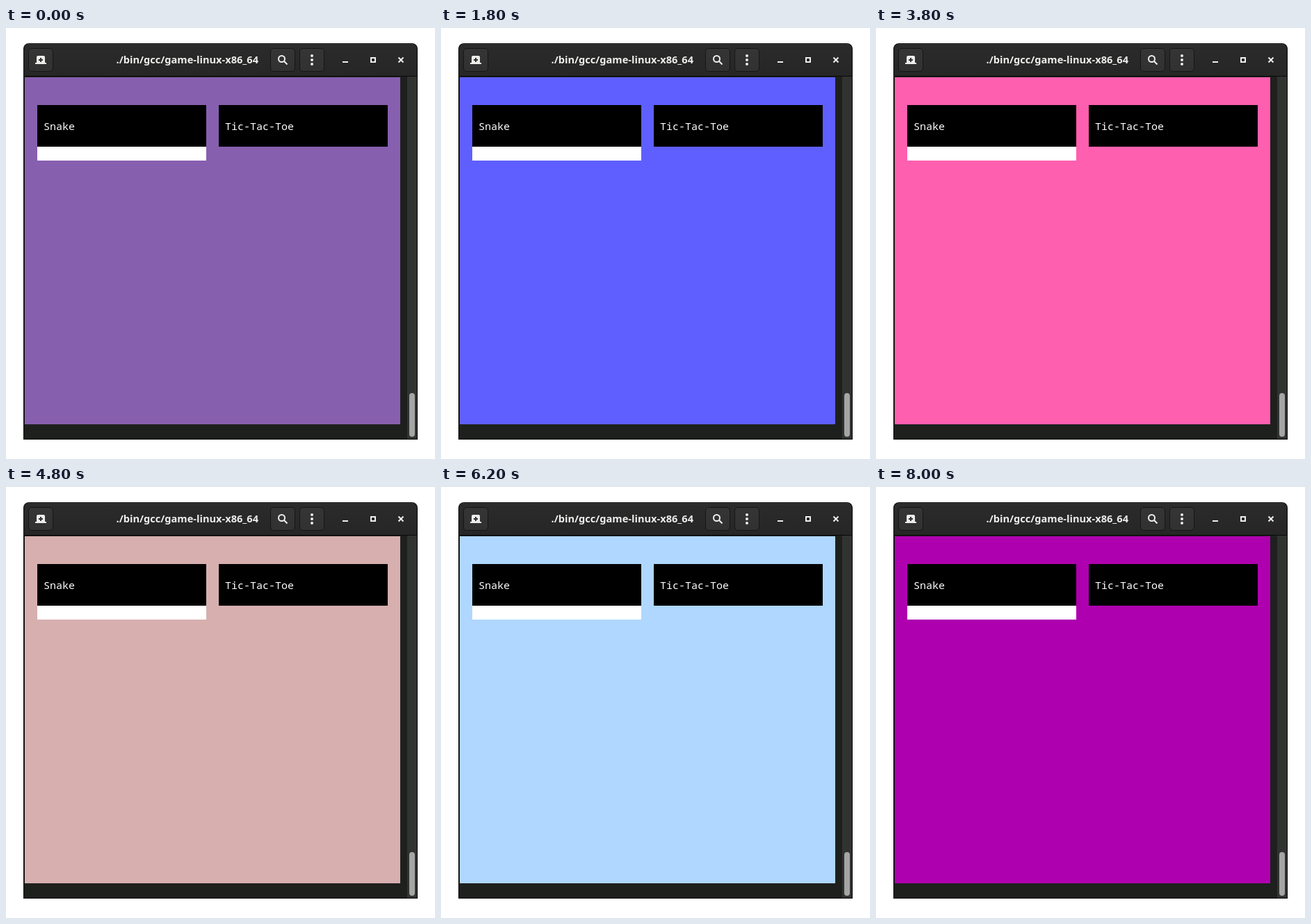
These frames come from a looping animation (617 by 621 pixels, 8200 ms). An HTML page:

```html
<!DOCTYPE html>
<html lang="en">
<head>
<meta charset="utf-8">
<title>Game menu</title>
<style>
  html, body { margin: 0; width: 100%; height: 100%; overflow: hidden; background: #fff; }
  svg { display: block; }
  .title { font: bold 14.6px "Noto Sans", "Open Sans", sans-serif; fill: #eeeeec; text-anchor: middle; }
  .cell { font: 15px "Noto Sans Mono", "DejaVu Sans Mono", monospace; fill: #fff; }
  .button { fill: url(#raised); stroke: #161616; }
  .line { fill: none; stroke: #eeeeec; stroke-width: 2; }
  .icon { fill: #eeeeec; }
</style>
</head>
<body>
<svg width="617" height="621" viewBox="0 0 617 621">
  <defs>
    <linearGradient id="bar" x2="0" y2="1">
      <stop offset="0" stop-color="#2b2b2b"/>
      <stop offset="1" stop-color="#252625"/>
    </linearGradient>
    <linearGradient id="raised" x2="0" y2="1">
      <stop offset="0" stop-color="#353535"/>
      <stop offset="1" stop-color="#303130"/>
    </linearGradient>
  </defs>

  <!-- Window -->
  <path d="M25 593V30a8 8 0 0 1 8-8H584a8 8 0 0 1 8 8V593z" fill="#070707"/>
  <path d="M26 69V30a7 7 0 0 1 7-7H584a7 7 0 0 1 7 7V69z" fill="url(#bar)"/>
  <path d="M31 23.5H586" stroke="#383838"/>
  <path d="M26 70H591V592H26z" fill="#1e201e"/>
  <path d="M577 70H591V592H577z" fill="#313331"/>
  <rect x="580" y="526" width="8" height="63" rx="4" fill="#a4a5a4"/>

  <!-- Header -->
  <rect class="button" x="32.5" y="29.5" width="35" height="33" rx="4.5"/>
  <rect class="button" x="380.5" y="29.5" width="35" height="33" rx="4.5"/>
  <rect class="button" x="422.5" y="29.5" width="35" height="33" rx="4.5"/>
  <path class="icon" d="M44 50V42a2 2 0 0 1 2-2h8a2 2 0 0 1 2 2v8h2v2H42v-2z"/>
  <path d="M47 46h6M50 43v6" stroke="#303130" stroke-width="2"/>
  <text class="title" x="260.8" y="51">./bin/gcc/game-linux-x86_64</text>
  <circle class="line" cx="396.5" cy="44.5" r="4.5"/>
  <path class="line" d="M399.8 47.8L404.5 52.5"/>
  <g class="icon">
    <circle cx="440" cy="40" r="2"/>
    <circle cx="440" cy="46" r="2"/>
    <circle cx="440" cy="52" r="2"/>
    <path d="M484 48h8v2h-8z"/>
  </g>
  <path class="line" d="M525 43h6v6h-6z"/>
  <path class="line" d="M564.5 42.5l7 7m0-7l-7 7"/>

  <!-- Menu -->
  <rect id="screen" x="27" y="71" width="540" height="500" fill="#875faf"/>
  <path d="M45 111h243v60H45zM306 111h243v60H306z"/>
  <path d="M45 171h243v20H45z" fill="#fff"/>
  <text class="cell" x="54" y="147">Snake</text>
  <text class="cell" x="315" y="147">Tic-Tac-Toe</text>
</svg>
<script>
  const STEP = 200, STEPS = 41, CUBE = 216;
  const screen = document.getElementById("screen");

  // [step, position] of a downward sweep through the 6x6x6 terminal colour cube
  const sweep = [[0, 81], [9, 47], [15, -8], [24, -51], [31, -79], [35, -90], [40, -105]];

  function cubeIndex(step) {
    const next = Math.max(1, sweep.findIndex(([s]) => s >= step));
    const [s0, p0] = sweep[next - 1], [s1, p1] = sweep[next];
    const pos = Math.round(p0 + (p1 - p0) * (step - s0) / (s1 - s0));
    return (pos + CUBE) % CUBE;
  }

  const level = n => n ? 55 + 40 * n : 0;

  function cubeColor(i) {
    const rgb = [Math.floor(i / 36), Math.floor(i / 6) % 6, i % 6].map(level);
    return `rgb(${rgb})`;
  }

  const start = performance.now();

  function draw() {
    const step = Math.floor((performance.now() - start) / STEP) % STEPS;
    screen.setAttribute("fill", cubeColor(cubeIndex(step)));
    requestAnimationFrame(draw);
  }
  draw();
</script>
</body>
</html>
```
